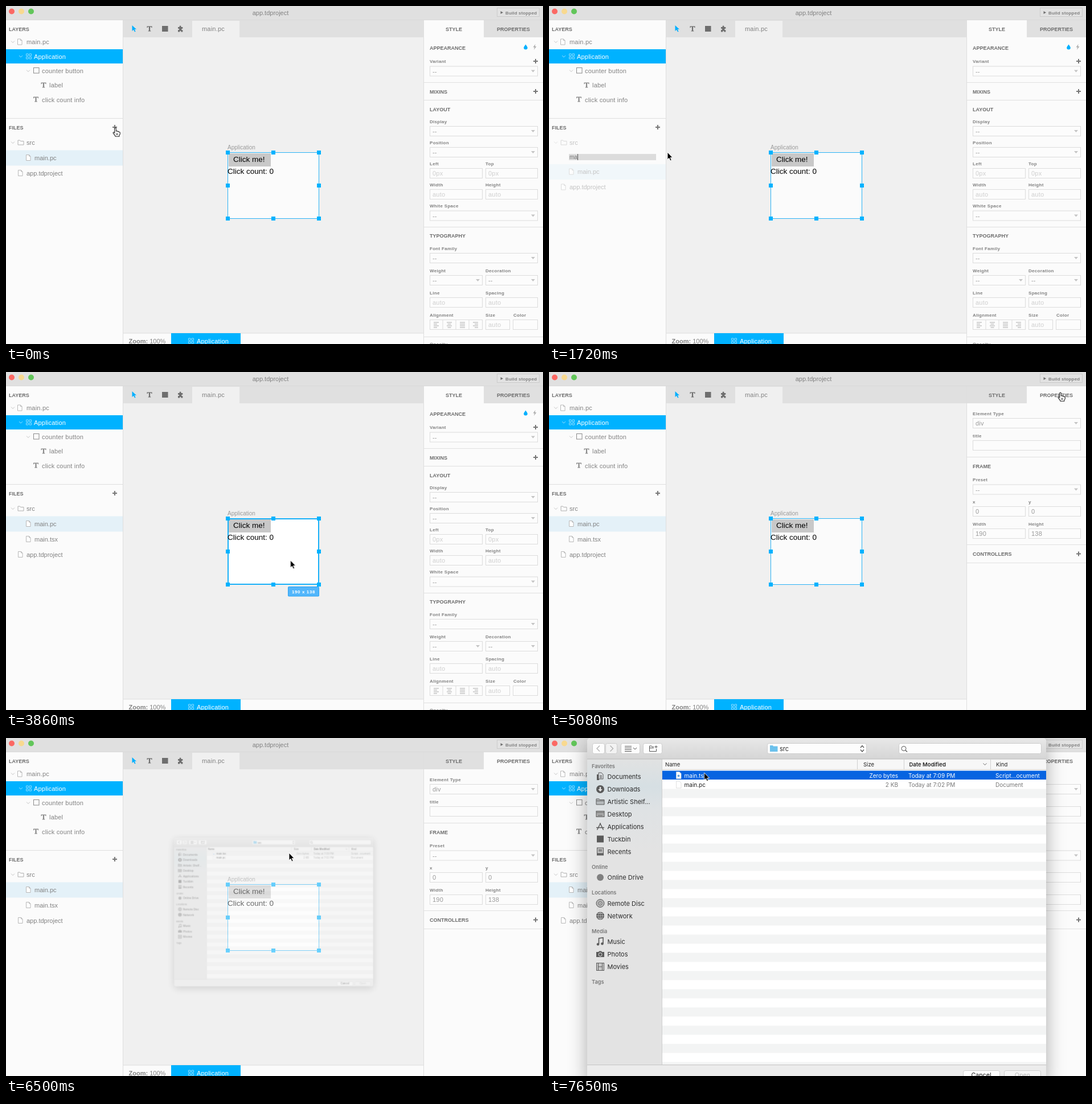
Write an HTML page that moves like this. It is 943 by 594 pixels and loops after 8000 ms.

```html
<!DOCTYPE html>
<html lang="en">
<head>
<meta charset="utf-8">
<title>Interface builder</title>
<style>
html, body { margin: 0; width: 100%; height: 100%; overflow: hidden; background: #f0f0f0; }
svg { position: absolute; left: 0; top: 0; width: 943px; height: 594px; }
text { dominant-baseline: central; font: 11px "Liberation Sans", Arial, sans-serif; fill: #828282; }
.row { letter-spacing: .2px; }
.head { font-size: 9px; font-weight: bold; fill: #6c6c6c; }
.label { font-size: 8px; font-weight: bold; letter-spacing: .3px; fill: #808080; }
.value { letter-spacing: .2px; fill: #999; }
.hint { letter-spacing: .2px; fill: #cfcfcf; }
.demo { font-size: 13.5px; fill: #000; }
.small { font-size: 10px; fill: #9a9a9a; }
.badge { font-size: 8px; font-weight: bold; letter-spacing: .6px; fill: #fff; }
.tight { letter-spacing: .15px; }
.white { fill: #fff; }
.strong { font-weight: bold; }
.mid { text-anchor: middle; }
.end { text-anchor: end; }
#dialog text { font: 10px Inter, "Open Sans", sans-serif; fill: #777; }
#dialog .side { font-size: 11px; fill: #2b2b2b; }
#dialog .group { font-size: 9.2px; font-weight: 600; }
#dialog .col { font-size: 9.5px; fill: #222; }
#dialog .bold { font-weight: 600; }
#dialog .file, #dialog .btn { fill: #1c1c1c; }
#dialog .btn { font-size: 10.7px; }
#dialog .off { fill: #b8b8b8; }
#dialog .pick text { fill: #fff; }
#shade { filter: drop-shadow(0 8px 16px rgba(0, 0, 0, .32)); }

#name { position: absolute; left: 35px; top: 260px; width: 153px; height: 11px; background: #dcdcdc; }
#typed { position: absolute; left: 1px; top: 0; height: 11px; overflow: hidden; white-space: nowrap;
  border-right: 1px solid #555; font: 10px/11px "Liberation Sans", Arial, sans-serif; color: #777; }

.k, #name, #typed { animation: 8s step-end infinite; }
#files { animation-name: files; }
#menu { animation-name: menu; }
#naming, #name { animation-name: naming; }
#typed { animation-name: typed; }
#saved { animation-name: saved; }
#hover { animation-name: hover; }
#style { animation-name: style; }
#props { animation-name: props; }
#dialog { animation-name: dialog; transform-origin: 470px 302px; }
#back { animation-name: back; }
#pick { animation-name: pick; }
#cursor { animation-name: cursor; }
#arrow { animation-name: arrow; }
#hand { animation-name: hand; }

@keyframes files { 0% { opacity: 1 } 15.5%, 100% { opacity: 0 } }
@keyframes menu { 0%, 15.5%, 100% { opacity: 0 } 4.375% { opacity: 1 } }
@keyframes naming { 0%, 39.375%, 100% { opacity: 0 } 15.5% { opacity: 1 } }
@keyframes saved { 0% { opacity: 0 } 39.375%, 100% { opacity: 1 } }
@keyframes hover { 0%, 54.125%, 100% { opacity: 0 } 46.75% { opacity: 1 } }
@keyframes style { 0% { opacity: 1 } 63.5%, 100% { opacity: 0 } }
@keyframes props { 0% { opacity: 0 } 63.5%, 100% { opacity: 1 } }
@keyframes pick { 0% { opacity: 0 } 95.625%, 100% { opacity: 1 } }
@keyframes back { 0% { stroke: #444 } 88.25%, 100% { stroke: #b4b4b4 } }
@keyframes dialog {
  0% { opacity: 0; transform: none }
  81.25% { opacity: .42; transform: translateY(4px) scale(.433) }
  82.625%, 100% { opacity: 1; transform: none }
}
@keyframes typed {
  0% { width: 0 } 21.5% { width: 14px } 23% { width: 16.2px } 26% { width: 21.8px }
  28.875% { width: 27.3px } 30.375% { width: 32.3px } 36.375%, 100% { width: 37.4px }
}
@keyframes arrow { 0%, 60.5%, 73.75% { opacity: 0 } 8.125%, 65%, 78.25%, 100% { opacity: 1 } }
@keyframes hand { 0%, 60.5%, 73.75% { opacity: 1 } 8.125%, 65%, 78.25%, 100% { opacity: 0 } }
@keyframes cursor {
  0% { transform: translate(192px, 214px) }
  8.125% { transform: translate(197px, 228px) }
  9.625% { transform: translate(205px, 246px) }
  11.125% { transform: translate(208px, 257px) }
  43.75% { transform: translate(275px, 290px) }
  45.25% { transform: translate(375px, 325px) }
  46.75% { transform: translate(455px, 335px) }
  48.25% { transform: translate(499.5px, 331px) }
  54.125% { transform: translate(640px, 215px) }
  55.625% { transform: translate(902px, 2px) }
  58.625% { transform: translate(902px, 24px) }
  60.5% { transform: translate(898px, 36px) }
  65% { transform: translate(901px, 62px) }
  66.5% { transform: translate(906px, 120px) }
  68% { transform: translate(914px, 190px) }
  69.375% { transform: translate(922px, 255px) }
  70.875% { transform: translate(927px, 300px) }
  72.25% { transform: translate(928px, 318px) }
  73.75% { transform: translate(927px, 319px) }
  75.25% { transform: translate(928px, 321px) }
  78.25% { transform: translate(890px, 305px) }
  79.75% { transform: translate(700px, 250px) }
  81.25% { transform: translate(497px, 202px) }
  82.625% { transform: translate(446.5px, 178px) }
  86% { transform: translate(380px, 157px) }
  88.25% { transform: translate(375px, 150px) }
  89.75% { transform: translate(340px, 115px) }
  91.25% { transform: translate(300px, 82px) }
  92.75% { transform: translate(278px, 66px) }
  94.125%, 100% { transform: translate(272.5px, 61px) }
}
</style>
</head>
<body>
<svg id="app" viewBox="0 0 943 594"></svg>
<div id="name"><div id="typed">main.tsx</div></div>
<svg id="top" viewBox="0 0 943 594"></svg>
<script>
const text = (x, y, s, cls = '') => `<text x="${x}" y="${y}" class="${cls}">${s}</text>`;
const rect = (x, y, w, h, fill, more = '') =>
  `<rect x="${x}" y="${y}" width="${w}" height="${h}" fill="${fill}" ${more}/>`;
const path = (d, fill = 'none', stroke = 'none', w = 1) =>
  `<path d="${d}" fill="${fill}" stroke="${stroke}" stroke-width="${w}"/>`;
const circle = (x, y, r, fill, stroke = 'none') =>
  `<circle cx="${x}" cy="${y}" r="${r}" fill="${fill}" stroke="${stroke}"/>`;
const at = (x, y, s) => `<g transform="translate(${x} ${y})">${s}</g>`;
const layer = (id, s) => `<g id="${id}" class="k">${s}</g>`;

// Small icons, centred on x, y
const chevron = (x, y, c = '#c4c4c4') => at(x, y, path('M-3-1.5L0 1.5 3-1.5', 'none', c));
const page = (x, y) => at(x, y, path('M-3.5-5H1.5L4-2.5V5H-3.5ZM1.5-5V-2.5H4', '#fff', '#b8b8b8'));
const folder = (x, y) => at(x, y, path('M-5-4H-1.5L-.5-2.5H5V4H-5Z', 'none', '#b0b0b0'));
const tee = (x, y, c = '#8a8a8a') => at(x, y,
  path('M-4.5-4.5H4.5V-1.8H3.6L3-3.2H1.1V3.2L2.3 3.6V4.4H-2.3V3.6L-1.1 3.2V-3.2H-3L-3.6-1.8H-4.5Z', c));
const plus = (x, y) => at(x, y, path('M-4 0H4M0-4V4', 'none', '#777', 2));
const blocks = (x, y, c) => at(x, y,
  path('M-4.5-4.5h3.5v3.5h-3.5zM1-4.5h3.5v3.5H1zM-4.5 1h3.5v3.5h-3.5zM1 1h3.5v3.5H1z', 'none', c));

// Form parts
const rule = y => rect(734, y, 209, 1, '#e0e0e0');
const box = (x, y, w) => rect(x + .5, y - 8.5, w - 1, 17, '#fcfcfc', 'stroke="#dcdcdc"');
const input = (x, y, w, s, cls = 'hint') => box(x, y, w) + text(x + 5, y, s, cls);
const select = (x, y, w, s = '--') => input(x, y, w, s, 'value') +
  path(`M${x + w - 12} ${y - 2}h7l-3.5 4z`, '#c4c4c4');
const wide = (y, label, s) => text(744, y, label, 'label') + select(744, y + 17, 190, s);
const pair = (y, a, b, field, sa, sb = sa, cls) =>
  text(744, y, a, 'label') + text(842, y, b, 'label') +
  field(744, y + 17, 93, sa, cls) + field(842, y + 17, 92, sb, cls);

function tabs(active) {
  return rect(734, 25, 209, 569, '#fbfbfb') +
    rect(active ? 734 : 839, 25, active ? 105 : 104, 30, '#e0e0e0') +
    text(786.5, 41, 'STYLE', 'head mid') + text(891, 41, 'PROPERTIES', 'head mid');
}

function alignButtons() {
  const bar = (i, j) => {
    const w = i === 2 || j % 2 === 0 ? 9 : 6;
    const left = i === 1 ? -w / 2 : i === 3 ? 4.5 - w : -4.5;
    return rect(755.5 + i * 23 + left, 555.5 + j * 3, w, 1, '#aaa');
  };
  return [0, 1, 2, 3].map(i =>
    (i ? rect(743.5 + i * 23, 551, 1, 18, '#dcdcdc') : '') +
    [0, 1, 2, 3].map(j => bar(i, j)).join('')).join('');
}

function stylePanel() {
  return tabs(0) +
    text(744, 73.5, 'APPEARANCE', 'head') +
    path('M912.5 67.5c2 3 3.3 4.3 3.3 6a3.3 3 0 0 1-6.6 0c0-1.7 1.3-3 3.3-6z', '#00b0ff') +
    path('M929.5 67L925.5 72.5H928L927 77 931.5 71H929Z', '#b0b0b0') +
    wide(97.5, 'Variant') + plus(930, 97) + rule(134) +
    text(744, 150.5, 'MIXINS', 'head') + plus(930, 150) + rule(165) +
    text(744, 181.5, 'LAYOUT', 'head') + wide(203, 'Display') + wide(240, 'Position') +
    pair(277, 'Left', 'Top', input, '0px') + pair(314, 'Width', 'Height', input, 'auto') +
    wide(351.5, 'White Space') + rule(388) +
    text(744, 404, 'TYPOGRAPHY', 'head') + wide(426, 'Font Family') +
    pair(465, 'Weight', 'Decoration', select, '--') + pair(504, 'Line', 'Spacing', input, 'auto') +
    text(744, 543, 'Alignment', 'label') + text(842, 543, 'Size', 'label') + text(891, 543, 'Color', 'label') +
    box(744, 560, 93) + alignButtons() + input(842, 560, 43, 'auto') + box(890, 560, 44) +
    rule(581) + text(744, 594, 'Opacity', 'label');
}

function propsPanel() {
  return tabs(1) + wide(73, 'Element Type', 'div') +
    text(744, 112, 'title', 'label') + box(744, 129, 190) + rule(149) +
    text(744, 165.5, 'FRAME', 'head') + wide(189.5, 'Preset') +
    pair(228, 'x', 'y', input, '0', '0', 'value') +
    pair(267, 'Width', 'Height', input, '190', '138', 'value') + rule(303) +
    text(744, 320, 'CONTROLLERS', 'head') + plus(930, 319.5) + rule(335);
}

// File tree: src, the highlighted main.pc at height pc, then the rest
function tree(pc, rest) {
  return chevron(12, 240) + folder(26, 240) + text(36, 240, 'src') +
    rect(0, pc - 13, 205, 27, '#e4f1f8') + page(39, pc) + text(50, pc, 'main.pc') +
    rest.map(([x, y, s]) => page(x, y) + text(x + 11, y, s)).join('');
}

function leftPanel() {
  return rect(0, 25, 205, 569, '#fbfbfb') + rect(205, 25, 1, 569, '#dedede') +
    text(5, 41, 'LAYERS', 'head') +
    chevron(12, 63) + page(24, 63) + text(36, 63, 'main.pc', 'row') +
    rect(0, 76, 205, 25, '#00b2ff') + chevron(26, 88.5, '#8edcff') + blocks(40, 88.5, '#8edcff') +
    text(49, 88.5, 'Application', 'row white') +
    chevron(39, 114) + rect(48.5, 108.5, 9.5, 9.5, 'none', 'stroke="#8a8a8a"') + text(63, 114, 'counter button', 'row') +
    tee(66, 139) + text(76, 139, 'label', 'row') +
    tee(52.5, 164) + text(63, 164.5, 'click count info', 'row') +
    rect(0, 197, 205, 1, '#dedede') + text(5, 213.5, 'FILES', 'head') + plus(191, 213) +
    layer('files', tree(266.5, [[25, 293.5, 'app.tdproject']])) +
    layer('naming', `<g opacity=".45">${tree(291, [[25, 318, 'app.tdproject']])}</g>`) +
    layer('saved', tree(266.5, [[39, 293.5, 'main.tsx'], [25, 320.5, 'app.tdproject']]));
}

function canvas() {
  const handles = [389.5, 469.5, 549.5].flatMap(x => [257.5, 315.5, 373.5].map(y => [x, y]))
    .filter(([x, y]) => x !== 469.5 || y !== 315.5)
    .map(([x, y]) => rect(x - 3.5, y - 3.5, 7, 7, '#00b2ff')).join('');
  const hover = rect(390, 258, 159, 115, '#fff', 'stroke="#18b0f8" stroke-width="2"') +
    rect(495.5, 377.5, 54, 16.5, '#52b6fb', 'stroke="#2ba3f2" rx="1"') + text(522.5, 386.5, '190 x 138', 'badge mid');
  return text(389, 248, 'Application', 'small') +
    rect(389.5, 257.5, 160, 116, '#fbfbfb', 'stroke="#2ab2f5"') + layer('hover', hover) +
    rect(391, 259, 74, 23, '#c8c8c8') + text(399, 269.5, 'Click me!', 'demo') +
    text(389, 290, 'Click count: 0', 'demo') + handles;
}

function chrome() {
  return rect(0, 0, 943, 25, '#e0e0e0') + rect(0, 24.5, 943, 1, '#d4d4d4') +
    circle(10, 9.5, 5, '#fb6964') + circle(27, 9.5, 5, '#f8d98f') + circle(44, 9.5, 5, '#62c65a') +
    text(464.5, 11.5, 'app.tdproject', 'mid') +
    rect(862.5, 3.5, 74, 15, '#e2e2e2', 'stroke="#cbcbcb"') + path('M868.5 9v5l4.5-2.5z', '#707070') +
    text(877, 12, 'Build stopped', 'label tight') +
    rect(206, 25, 121, 30, '#e0e0e0') + rect(410, 25, 323, 30, '#e0e0e0') +
    path('M221.5 34V44L224 41.7 226 45.5 227.6 44.7 225.7 41H229Z', '#00b0ff') +
    tee(252, 40, '#6e6e6e') + rect(274, 35, 10.5, 10, '#6e6e6e') +
    path('M302 37h2.8c-1.5-3.5 4-3.5 2.5 0h3v3c-3-1.2-3 3.2 0 2v3.5h-3c1-2.5-3-2.5-2 0H302v-3.5c3 1 3-3 0-2z', '#6e6e6e') +
    text(344, 39.5, 'main.pc', 'row') +
    rect(206, 575, 527, 19, '#fbfbfb') + rect(206, 574.5, 527, 1, '#dedede') +
    text(215.5, 588.5, '<tspan class="strong">Zoom:</tspan> 100%') +
    rect(290, 575, 122, 19, '#00b2ff') + blocks(325, 588.5, '#8edcff') + text(335, 588.5, 'Application', 'row white') +
    rect(733, 25, 1, 569, '#dedede');
}

// Sidebar glyphs drawn around 0,0
const ink = '#5a5a5a';
const line = d => path(d, 'none', ink);
const glyphs = {
  docs: path('M-6-4H-2V6H-6Z', ink) + path('M-3-7H2L5-4V4H-3Z', '#d9dde0', ink) + line('M-1-2H3M-1 0H3M-1 2H3'),
  down: circle(0, 0, 7, ink) + path('M-1.2-4H1.2V0H3.8L0 4.2-3.8 0H-1.2Z', '#e4e4e4'),
  folder: path('M-7-5H-2L-1-3.5H7V5H-7Z', '#b4b8ba', ink) + line('M-7-1.5H7'),
  desk: rect(-7, -5, 14, 10, '#aaa', `stroke="${ink}"`) + line('M-7-2.5H7M-4 2.5H4'),
  apps: path('M-5.5 6L.5-6M5.5 6L-.5-6M-7 2H7', 'none', ink, 1.5),
  square: rect(-6, -6, 12, 12, ink),
  recent: rect(-5.5, -6.5, 11, 13, '#bbb', `stroke="${ink}"`) + line('M-3-3H3M-3-1H3') + rect(-5, 3, 10, 3, ink),
  dot: circle(0, 0, 6, '#808080'),
  disc: circle(0, 0, 7, '#b4b4b4', ink) + circle(0, 0, 3, '#d8d8d8', ink) + circle(0, 0, 1, ink),
  globe: circle(0, 0, 7, ink) + path('M-7 0H7M0-7V7M-5-4H5M-5 4H5M0-7C-5-3-5 3 0 7 5 3 5-3 0-7', 'none', '#c8c8c8', .8),
  music: path('M-2.5 4V-6L5-7V3', 'none', ink, 1.6) + circle(-4, 4.5, 2.3, ink) + circle(3.5, 3.5, 2.3, ink),
  photo: path('M-7-4H-3L-2-5.5H2L3-4H7V5H-7Z', ink) + circle(0, .5, 3, ink, '#ddd'),
  film: rect(-6.5, -6.5, 13, 13, '#c8c8c8', `stroke="${ink}"`) + line('M-3.5-6V6M3.5-6V6M-3.5 0H3.5')
};

function sidebar() {
  const items = [
    [68, 'docs', 'Documents'], [90, 'down', 'Downloads'], [112, 'folder', 'Artistic Shelf...'],
    [133.5, 'desk', 'Desktop'], [155.5, 'apps', 'Applications'], [177.5, 'square', 'Tuckbin'],
    [199.5, 'recent', 'Recents'], [245, 'dot', 'Online Drive'], [290.5, 'disc', 'Remote Disc'],
    [312.5, 'globe', 'Network'], [358, 'music', 'Music'], [380, 'photo', 'Photos'], [402, 'film', 'Movies']
  ];
  const groups = [[49, 'Favorites'], [226, 'Online'], [271.5, 'Locations'], [339, 'Media'], [428.5, 'Tags']];
  return rect(67, 37, 131, 538, 'url(#tint)') + rect(198, 37, 1, 538, '#cfcfcf') +
    groups.map(([y, s]) => text(75, y, s, 'group')).join('') +
    items.map(([y, icon, s]) => at(90, y, glyphs[icon]) + text(102.5, y, s, 'side')).join('');
}

const fileRow = (y, dot, name, size, date, kind) =>
  path(`M223.5 ${y - 6}h5.5l3 3v9h-8.5z`, '#fff', '#d4d4d4', .7) + (dot ? circle(227.5, y + 1, 2, '#6aa5dc') : '') +
  text(237.5, y, name, 'file') + text(613, y, size, 'end') + text(631, y, date) + text(784, y, kind);

function dialog() {
  const button = (x, y, w, h, fill = '#fdfdfd') => rect(x + .5, y + .5, w - 1, h - 1, fill, 'rx="3" stroke="#cdcdcd"');
  const first = [65.5, true, 'main.tsx', 'Zero bytes', 'Today at 7:09 PM', 'Script...ocument'];
  let stripes = '';
  for (let y = 57.5; y < 574; y += 32) stripes += rect(199, y, 674, Math.min(16, 574 - y), '#f3f4f4');
  return `<defs>
      <linearGradient id="bar" x2="0" y2="1"><stop stop-color="#e8e8e8"/><stop offset="1" stop-color="#d5d5d5"/></linearGradient>
      <linearGradient id="tint" x2="0" y2="1"><stop stop-color="#e1e2e2"/><stop offset=".09" stop-color="#d6dfe3"/>
        <stop offset=".17" stop-color="#dfe2e4"/><stop offset=".3" stop-color="#e3e3e3"/><stop offset="1" stop-color="#e3e3e3"/></linearGradient>
    </defs>` +
    rect(67, .5, 806, 602.5, '#ececec', 'rx="5" id="shade"') +
    path('M67 37V5.500a5 5 0 0 1 5-5H868a5 5 0 0 1 5 5V37Z', 'url(#bar)') + sidebar() +
    rect(199, 37, 674, 18, '#f7f7f7') + rect(199, 55, 674, 519, '#fff') + stripes +
    rect(67, 36.5, 806, 1, '#bcbcbc') + rect(199, 55, 674, 1, '#d0d0d0') +
    [541, 623, 775].map(x => rect(x, 38, 1, 17, '#d0d0d0')).join('') +
    button(76, 9, 22, 19) + button(99, 9, 21, 19, '#f2f2f2') + button(126, 9, 34, 19) + button(165, 9, 34, 19) +
    '<path id="back" class="k" d="M89 13.5L84 18.5 89 23.5" fill="none" stroke-width="1.4"/>' +
    path('M107.5 13.5L112.5 18.5 107.5 23.5', 'none', '#b0b0b0', 1.4) +
    path('M133 14.5H145M133 17.5H145M133 20.5H145M133 23.5H145', 'none', '#555') + chevron(151, 18.5, '#555') +
    path('M184 15.5H181L180 14H176.5V23.500H188.500V19M176.500 17.500H184M188 13v5M185.500 15.500h5', 'none', '#555') +
    button(383, 9, 175, 19) + path('M388 13h5l1 1.5h7.5V24H388Z', '#6cc1ec') +
    text(405, 19, 'src', 'side') + path('M547 17l3-3.5 3 3.5M547 20.5l3 3.5 3-3.5', 'none', '#555', 1.3) +
    button(614, 9, 251, 19) + path('M626 21.5L629 24.5', 'none', '#555', 1.3) + circle(623, 18.5, 4, 'none', '#555') +
    text(204, 46, 'Name', 'col') + text(552, 46, 'Size', 'col') +
    text(632.5, 46, 'Date Modified', 'col bold') + chevron(765.5, 46, '#666') + text(785, 46, 'Kind', 'col') +
    fileRow(...first) + fileRow(82, false, 'main.pc', '2 KB', 'Today at 7:02 PM', 'Document') +
    layer('pick', `<g class="pick">${rect(199, 57.5, 674, 15.5, '#0764e1')}${fileRow(...first)}</g>`) +
    rect(67, 574, 806, 1, '#c4c4c4') +
    button(727, 584, 65, 17) + text(759, 592.5, 'Cancel', 'btn mid') +
    button(799, 584, 65, 17, '#f4f4f4') + text(831.5, 592.5, 'Open', 'btn mid off');
}

const menu = rect(184.5, 228.5, 120, 59, '#fff', 'stroke="#dcdcdc"') +
  text(195, 243, 'New file', 'row') + text(195, 273, 'New folder', 'row');

const cursor = layer('arrow', path('M0 0V12.8L2.9 10.2 5 15 7.2 14 5.1 9.4H9Z', '#000', '#fff', .9)) +
  layer('hand', path('M-1.3 1.3a1.3 1.3 0 0 1 2.6 0V6l1.1-.5 1.3.5.5.6 1.3-.2 1 .9 1.2.2.5.9V11L6.8 13.6V15.3H0L-.4 13.8-3.6 9.6C-4.6 8-2.8 7.2-1.8 8.3L-1.3 8.9Z',
    '#fff', '#222', 1.1) + path('M2 9.5V13M4 9.5V13', 'none', '#222', .9));

document.getElementById('app').innerHTML =
  rect(0, 0, 943, 594, '#f0f0f0') + chrome() + canvas() + leftPanel() +
  layer('style', stylePanel()) + layer('props', propsPanel());
document.getElementById('top').innerHTML =
  layer('menu', menu) + layer('dialog', dialog()) + layer('cursor', cursor);
</script>
</body>
</html>
```
